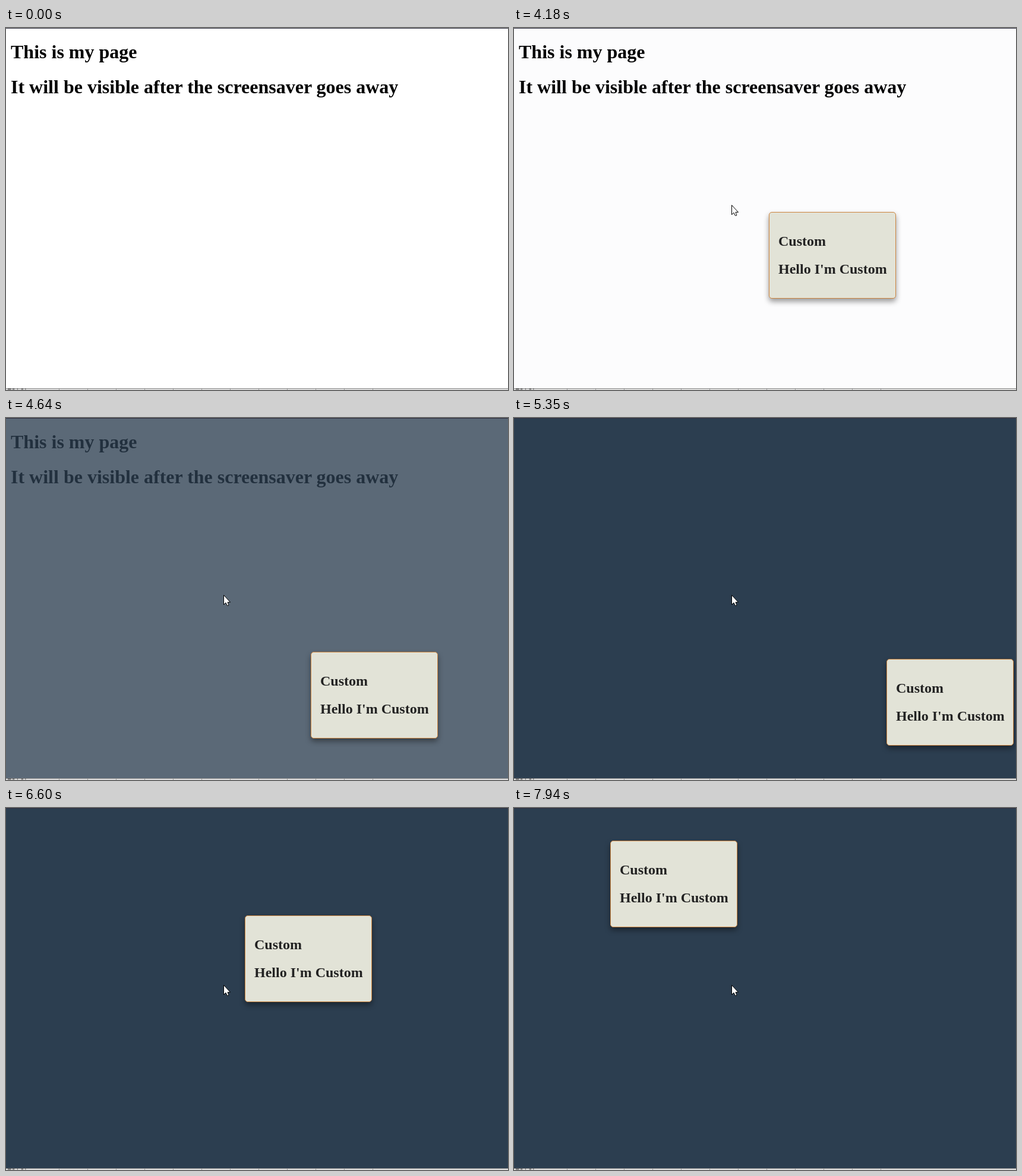
Recreate the animation shown at these times as an HTML page. Size 845x610 px, loop 8000 ms.

```html
<!DOCTYPE html>
<html lang="en">
<head>
<meta charset="utf-8">
<title>Screensaver</title>
<style>
  html, body { margin: 0; width: 845px; height: 610px; overflow: hidden; background: #fff; }
  div, h1, h2, svg { position: absolute; margin: 0; white-space: nowrap; }
  h1, h2 { font-family: "Liberation Serif", "Times New Roman", serif; font-weight: bold; }
  h1 { left: 8px; font-size: 32px; line-height: 36px; color: #000; }
  h2 { left: 15px; font-size: 24px; line-height: 26px; color: #222; }
  #page { left: 0; top: 0; width: 845px; height: 607px; overflow: hidden; }
  #cover { inset: 0; background: #2c3e50; }
  #card {
    left: 0; top: 0; width: 214px; height: 146px; box-sizing: border-box;
    background: #e2e3d7; border: 1px solid #cd853f; border-radius: 5px;
    box-shadow: 0 5px 10px rgba(0, 0, 0, .4);
  }
  #top { left: 0; top: 0; width: 845px; height: 1px; background: #2f2f40; }
  #bar {
    left: 0; top: 607px; width: 845px; height: 3px; overflow: hidden;
    box-sizing: border-box; border-top: 1px solid #8e8e8e; background: #dadada;
  }
  #ticks {
    left: 89px; top: 0; width: 529px; height: 2px;
    background: repeating-linear-gradient(90deg, #999 0 1px, transparent 1px 48px);
  }
  #year {
    left: 2px; top: -11px; color: #222;
    font: 13px/15px "Liberation Sans", Arial, sans-serif;
  }
</style>
</head>
<body>
<div id="page">
  <h1 style="top:22px">This is my page</h1>
  <h1 style="top:81px">It will be visible after the screensaver goes away</h1>
  <div id="cover"></div>
  <div id="card">
    <h2 style="top:35px">Custom</h2>
    <h2 style="top:82px">Hello I'm Custom</h2>
  </div>
</div>
<div id="top"></div>
<div id="bar"><div id="ticks"></div><div id="year">1970.</div></div>
<svg id="pointer" width="14" height="20" style="left:0;top:0">
  <path d="M.5 .5V16.5L4 13.2L6.3 18H8.6V16.5L7 12.4H11.5Z" fill="#fff" stroke="#000"/>
</svg>
<script>
const LOOP = 8000;
const el = id => document.getElementById(id);
const page = { cover: el('cover'), card: el('card'), pointer: el('pointer') };

// Screen refresh times, given as evenly spaced runs: [first, last, count]
const refreshes = runs => runs.flatMap(([first, last, count]) =>
  Array.from({ length: count }, (_, i) =>
    Math.floor((first + (last - first) * i / (count - 1)) / 10) * 10));

const pointerTimes = refreshes([[370, 1150, 11], [1210, 2000, 11], [2090, 2150, 2]]);
const cardTimes = refreshes([
  [4180, 4960, 11], [5050, 5810, 11], [5890, 6680, 11], [6770, 7530, 11], [7620, 7940, 5]
]);
const lastIndex = (times, t) => times.filter(v => v <= t).length - 1;

const route = [
  [733, 596], [600, 400], [450, 240], [320, 180], [242, 270], [275, 385], [410, 365],
  [464, 225], [370, 134], [250, 150], [228, 220], [333, 276], [366, 298]
];

// Catmull-Rom curve through the route
function along(u) {
  const i = Math.min(Math.floor(u), route.length - 2), f = u - i;
  const at = k => route[Math.max(0, Math.min(route.length - 1, k))];
  return [0, 1].map(c => {
    const [a, b, d, e] = [-1, 0, 1, 2].map(k => at(i + k)[c]);
    return b + f / 2 * (d - a + f * (2 * a - 5 * b + 4 * d - e + f * (3 * (b - d) + e - a)));
  });
}

// Position of a point bouncing between two walls
function bounce(start, moved, low, high) {
  const span = high - low;
  const p = (start - low + moved) % (2 * span);
  return low + (p > span ? 2 * span - p : p);
}

function place(node, shown, x = 0, y = 0) {
  node.style.visibility = shown ? 'visible' : 'hidden';
  node.style.transform = `translate(${Math.round(x)}px, ${Math.round(y)}px)`;
}

function draw(t) {
  const p = lastIndex(pointerTimes, t);
  const u = Math.max(p, 0) * (route.length - 1) / (pointerTimes.length - 1);
  place(page.pointer, p >= 0, ...along(u));

  const n = lastIndex(cardTimes, t);
  const moved = 3 * Math.round(4.68 * Math.max(n, 0));
  place(page.card, n >= 0, bounce(429, moved, 0, 633), bounce(310, moved, -2, 463));
  page.cover.style.opacity = n < 0 ? 0 : Math.min(1, (cardTimes[n] - 4174) / 600);
}

const begin = performance.now();
function tick() {
  draw((performance.now() - begin) % LOOP);
  requestAnimationFrame(tick);
}
tick();
</script>
</body>
</html>
```
